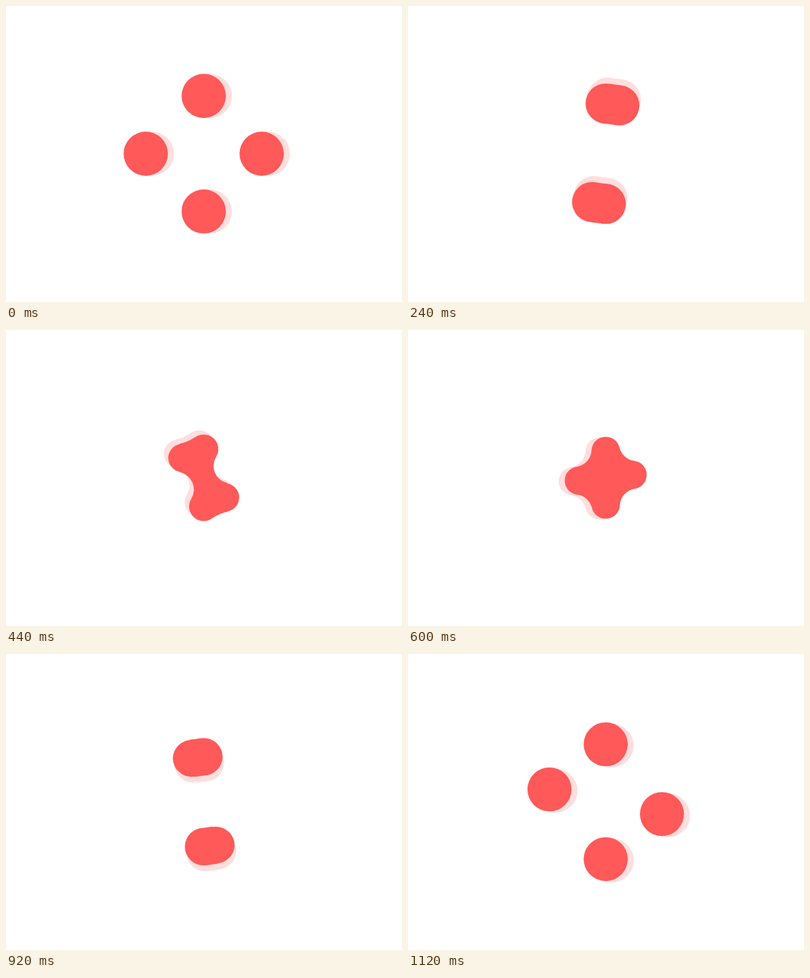
An HTML page for the animation above (1.16 s loop, 560x420 px).

```html
<!DOCTYPE html>
<html lang="en">
<head>
<meta charset="utf-8">
<title>Gooey loader</title>
<style>
  html, body { margin: 0; width: 100%; height: 100%; overflow: hidden; background: #fff; }
  svg { display: block; width: 100vw; height: 100vh; }
</style>
</head>
<body>
<svg viewBox="0 0 560 420">
  <path id="shadow" fill="#ffdede"/>
  <path id="blob" fill="#ff5959"/>
</svg>
<script>
const LOOP = 1160, STEP = 40, TAU = Math.PI * 2;
const CENTER = { x: 279.6, y: 209.6 };
const SHADOW_DISTANCE = 8.6;
const FUSED_FILLET = 25, PAIR_FILLET = 11, FUSE_GAP = 23.5;

const shadow = document.getElementById('shadow');
const blob = document.getElementById('blob');

const polar = (o, radius, angle) => ({
  x: o.x + radius * Math.cos(angle),
  y: o.y + radius * Math.sin(angle)
});
const pt = p => `${p.x.toFixed(2)} ${p.y.toFixed(2)}`;
const arc = (radius, sweep, p) =>
  `A${radius.toFixed(2)} ${radius.toFixed(2)} 0 0 ${sweep} ${pt(p)}`;

function disc(c, r) {
  const left = polar(c, r, Math.PI), right = polar(c, r, 0);
  return `M${pt(left)}${arc(r, 1, right)}${arc(r, 1, left)}Z`;
}

// Points where a ball resting against two discs touches them.
// The closer the discs, the larger the ball, so the joint flattens out.
function fillet(a, b, r, minBall, side) {
  const along = Math.atan2(b.y - a.y, b.x - a.x);
  const half = Math.hypot(b.x - a.x, b.y - a.y) / 2;
  const ball = Math.max(minBall, 16000 / (half * half));
  const reach = r + ball;
  if (half >= reach) return null;
  const tilt = Math.acos(half / reach) * side;
  return {
    ball,
    from: polar(a, r, along + tilt),
    to: polar(b, r, along + Math.PI - tilt),
    waist: Math.sqrt(reach * reach - half * half) - ball
  };
}

// Fills the area from the middle of the stage out to the concave edge.
function wedge(a, b, r) {
  const f = fillet(a, b, r, FUSED_FILLET, -1);
  if (!f) return '';
  return `M${pt(CENTER)}L${pt(a)}L${pt(f.from)}${arc(f.ball, 0, f.to)}L${pt(b)}Z`;
}

// Joins two neighbours with a neck that is concave on both sides.
function neck(a, b, r) {
  const outer = fillet(a, b, r, PAIR_FILLET, -1);
  if (!outer || outer.waist <= 0) return '';
  const inner = fillet(a, b, r, PAIR_FILLET, 1);
  return `M${pt(outer.from)}${arc(outer.ball, 0, outer.to)}` +
    `L${pt(inner.to)}${arc(inner.ball, 0, inner.from)}Z`;
}

function outline(turn, spread) {
  const distance = 38 + 44.1 * spread;
  const r = 20 + 11.35 * spread;
  const discs = [TAU / 4, TAU * 3 / 4, TAU - turn, TAU * 1.5 - turn]
    .map(angle => angle % TAU)
    .sort((a, b) => a - b)
    .map(angle => polar(CENTER, distance, angle));
  const join = distance - r < FUSE_GAP ? wedge : neck;
  return discs.map((c, i) => disc(c, r) + join(c, discs[(i + 1) % 4], r)).join('');
}

function draw(time) {
  const t = Math.floor((time % LOOP) / STEP) * STEP;
  const turn = TAU * t / LOOP;
  const spread = 1 / (1 + Math.exp(-0.0192 * (Math.abs(t - 600) - 302)));
  const path = outline(turn, spread);
  const offset = polar({ x: 0, y: 0 }, SHADOW_DISTANCE, -turn);
  blob.setAttribute('d', path);
  shadow.setAttribute('d', path);
  shadow.setAttribute('transform', `translate(${pt(offset)})`);
}

const start = performance.now();
function tick() {
  draw(performance.now() - start);
  requestAnimationFrame(tick);
}
tick();
</script>
</body>
</html>
```
